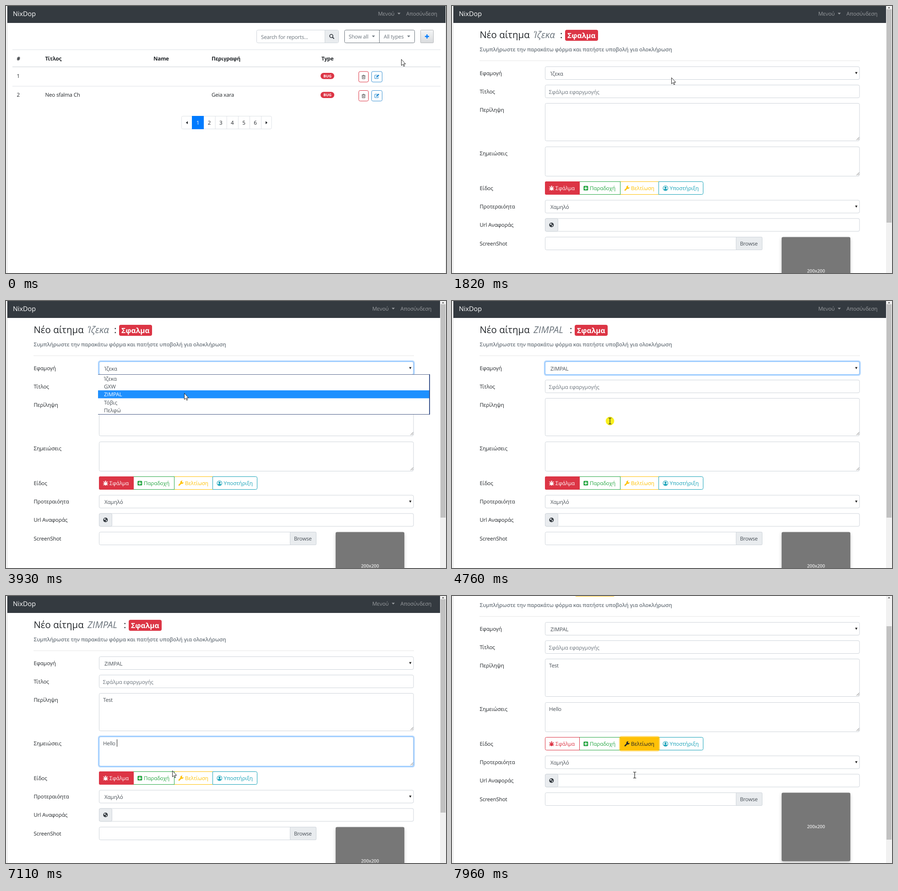
An HTML page for the animation above (8 s loop, 961 px wide and 583 px high).

```html
<!DOCTYPE html>
<html lang="el">
<head>
<meta charset="utf-8">
<title>Bug report form</title>
<style>
html, body { margin: 0; width: 100%; height: 100%; overflow: hidden; background: #fff; }
svg { display: block; width: 100vw; height: 100vh; }
text { font: 11.6px "Open Sans", "Noto Sans", sans-serif; letter-spacing: -.1px; white-space: pre; text-rendering: geometricPrecision; }
.en { letter-spacing: -.2px; }
.b { font-weight: 700; letter-spacing: -.25px; }
.mid { text-anchor: middle; }
.brand { font-size: 14.4px; letter-spacing: 0; }
.h { font-size: 20.4px; letter-spacing: 0; }
.i { font-style: italic; }
.sub { font-weight: 600; }
.badge { font-size: 15.5px; font-weight: 700; letter-spacing: 0; }
.pill { font-size: 8.2px; font-weight: 700; letter-spacing: 0; text-anchor: middle; }
</style>
</head>
<body>
<svg id="stage" viewBox="0 0 961 583"></svg>
<script>
const INK = '#212529', GREY = '#6c757d', FIELD = '#495057', LINE = '#ced4da';
const RED = '#dc3545', GREEN = '#28a745', GOLD = '#ffc107', TEAL = '#17a2b8', BLUE = '#007bff';
const APPS = ['Ίζεκα', 'GXW', 'ZIMPAL', 'Τόβις', 'Πελφώ'];

// drawing helpers, each returns SVG markup
const text = (x, y, s, fill = INK, cls = '', id = '') =>
  `<text x="${x}" y="${y}" fill="${fill}" class="${cls}" id="${id}">${s}</text>`;
const rect = (x, y, w, h, fill, stroke = 'none', r = 0, more = '') =>
  `<rect x="${x}" y="${y}" width="${w}" height="${h}" fill="${fill}" stroke="${stroke}" rx="${r}" ${more}/>`;
const path = (d, fill, stroke = 'none', w = 1, more = '') =>
  `<path d="${d}" fill="${fill}" stroke="${stroke}" stroke-width="${w}" ${more}/>`;
const at = (x, y, s) => `<g transform="translate(${x} ${y})">${s}</g>`;
const group = (id, s) => `<g id="${id}">${s}</g>`;
const caret = (x, y, fill, w = 3.4, h = 3.6) => path(`M${x - w},${y}h${2 * w}l${-w},${h}z`, fill);
const field = (y, h, x = 203.5, w = 686.5) => rect(x, y, w, h, '#fff', LINE, 3);
const ring = (id, x, y, w, h, edge, glow) => group(id,
  rect(x - 1.5, y - 1.5, w + 3, h + 3, 'none', glow, 4, 'stroke-width="2.4"') + rect(x, y, w, h, 'none', edge, 3));
const blueRing = (id, y, h) => ring(id, 203.5, y, 686.5, h, '#80bdff', 'rgba(0,123,255,.3)');
const grip = y => path(`M883.5,${y - 1.5}l6,-6M886.8,${y - 1.5}l2.7,-2.7`, 'none', '#666', .9);

const icon = {
  search: c => `<circle cx="-1" cy="-1" r="3.5" fill="none" stroke="${c}" stroke-width="1.7"/>` + path('M1.7,1.7L5,5', 'none', c, 2),
  trash: c => path('M-4,-2.5H4M-1.5,-2.7V-4H1.5V-2.7M-3,-2.5V4H3V-2.5M-1,-.8V2.4M1,-.8V2.4', 'none', c, .9),
  edit: c => path('M1.5,-3.5H-4.5V4H3V1', 'none', c, 1) + path('M-1.7,1.8L-1.3,-.6L3.4,-4.8L5.3,-2.8L.7,1.4z', c),
  bug: c => path('M-3,-1.2Q-3,-2.2 0,-2.2T3,-1.2V2Q2.6,5 0,5T-3,2zM-2,-3Q-1.8,-5.2 0,-5.2T2,-3z', c) +
    path('M-5,-3.6L-2.5,-1.3M5,-3.6L2.5,-1.3M-5.6,1H5.6M-5,4.6L-2.5,2.4M5,4.6L2.5,2.4', 'none', c, 1.1),
  plus: c => rect(-5, -5, 10, 10, c, 'none', 1.6) + path('M-3.2,0H3.2M0,-3.2V3.2', 'none', '#fff', 1.7),
  wrench: c => path('M-4.3,4.3L1.2,-1.2', 'none', c, 2.8, 'stroke-linecap="round"') +
    path('M3.2,-5.2A3.5,3.5 0 1 0 5.4,-2.4L2.9,-1.4L1.5,-2.8z', c),
  user: c => `<circle r="5.3" fill="none" stroke="${c}" stroke-width="1.1"/><circle cy="-1.3" r="2.3" fill="${c}"/>` +
    path('M-4,3Q-2.4,1.1 0,1.3T4,3Q2.3,5 0,5T-4,3', c),
  globe: c => `<circle r="5" fill="${c}"/>` + path('M-3.4,-2.5L-.6,-3.6L.6,-1.8L-1,.2L-2.6,-.2zM.8,.6L3.4,-.2L2.6,2.4L1,3.4z', '#e9ecef')
};

const navbar = (right, dx) => rect(3, 0, right - 3, 37, '#343a40') + text(15, 22, 'NixDop', '#fff', 'brand') +
  text(812.5 + dx, 20.7, 'Μενού', '#999c9f') + caret(858.3 + dx, 14.8, '#999c9f') + text(874 + dx, 20.7, 'Αποσύνδεση', '#999c9f');

function listPage() {
  const row = (n, y, title, about) => text(23.5, y + 4, n, INK, 'en') + text(85.5, y + 4, title, INK, 'en') +
    text(449, y + 4, about, INK, 'en') + rect(687, y - 6.5, 30, 13.5, RED, 'none', 6.7) + text(702, y + 3.3, 'BUG', '#fff', 'pill') +
    rect(770.5, y - 9.5, 21, 23, '#fff', RED, 3) + at(781, y + 2.5, icon.trash('#444')) +
    rect(798.5, y - 9.5, 23, 23, '#fff', '#3c93d3', 3) + at(810, y + 2, icon.edit('#2389cf'));
  let s = rect(0, 0, 961, 583, '#fff') + rect(960, 37, 1, 546, '#ddd') + navbar(960, 0);
  s += rect(547.5, 52.5, 179, 28, '#fff', LINE, 3) + path('M697,53H724Q726,53 726,55V78Q726,80 724,80H697z', '#e9ecef') +
    path('M696.5,52.5V80.5', 'none', LINE) + at(711.5, 66.5, icon.search('#343a40')) +
    text(557, 71.5, 'Search for reports...', GREY, 'en');
  s += rect(739.5, 52.5, 153, 28, '#fff', GREY, 3) + path('M815.5,52.5V80.5', 'none', GREY) +
    text(748.5, 70.8, 'Show all', GREY, 'en') + caret(802.5, 64.6, GREY) + text(825, 70.8, 'All types', GREY, 'en') + caret(879.5, 64.6, GREY);
  s += rect(905.5, 52.5, 28, 28, 'url(#metal)', '#b4b7ba', 1) + path('M915,66.5H924M919.5,62V71', 'none', BLUE, 2.4);
  s += rect(14, 95, 935, 1, '#dee2e6') + rect(14, 132, 935, 1.6, '#dee2e6') + rect(14, 174.6, 935, 1, '#dee2e6');
  for (const [x, label] of [[23.5, '#'], [85.5, 'Τίτλος'], [322, 'Name'], [449, 'Περιγραφή'], [689, 'Type']])
    s += text(x, 118.7, label, INK, 'b');
  s += row(1, 152.5, '', '') + row(2, 194, 'Neo sfalma Ch', 'Geia xara');
  s += rect(383.5, 240.5, 196.5, 28, '#fff', '#dee2e6', 3) + rect(406, 240, 26, 29, BLUE);
  for (let i = 0; i < 6; i++)
    s += text(419 + i * 25.1, 259, i + 1, i ? INK : '#fff', 'mid') + (i ? rect(431.5 + i * 25.1, 241, 1, 27, '#dee2e6') : '');
  s += path('M397,251.5V258L393,254.7zM567,251.5V258L571,254.7z', INK);
  return s + ring('ringPlus', 905.5, 52.5, 28, 28, '#8f9498', 'rgba(108,117,125,.4)');
}

function formPage() {
  let s = navbar(948, -12.5);
  s += text(60.5, 70.2, 'Νέο αίτημα', INK, 'h') + text(178, 70.2, '', GREY, 'h i', 'app') + text(236, 70.2, ':', INK, 'h', 'colon') +
    group('badge', rect(0, 52, 72, 24, RED, 'none', 4, 'id="badgeBox"') + text(5, 70, '', '#fff', 'badge', 'badgeText'));
  s += text(60.5, 99, 'Συμπλήρωστε την παρακάτω φόρμα και πατήστε υποβολή για ολοκλήρωση', GREY, 'sub') + rect(60, 119, 831, 1, '#e6e6e6');
  const labels = [['Εφαμογή', 147], ['Τίτλος', 187], ['Περίληψη', 227], ['Σημειώσεις', 321.5], ['Είδος', 398],
    ['Προτεραιόητα', 438], ['Url Αναφοράς', 478], ['ScreenShot', 519]];
  for (const [label, y] of labels) s += text(60.5, y + 4.2, label);
  s += field(132.5, 28) + text(215, 151.6, '', FIELD, '', 'choice') + caret(883, 144.3, '#222', 2.6, 4.6) +
    field(172.5, 28) + text(211.5, 192, 'Σφάλμα εφαργμογής', GREY) +
    field(212.5, 82) + grip(294) + text(212, 231.3, '', FIELD, 'en', 'summary') +
    field(307.5, 64) + grip(371) + text(212, 326, '', FIELD, 'en', 'notes');
  s += group('bugOn', rect(203, 383, 75.5, 29, RED, 'none', 3)) +
    path('M278.5,383.5H206.5Q203.5,383.5 203.5,386.5V408.5Q203.5,411.5 206.5,411.5H278.5', 'none', RED) +
    path('M367.5,383.5H451.5V411.5H367.5', 'none', GOLD) +
    path('M451.5,383.5H545.5Q548.5,383.5 548.5,386.5V408.5Q548.5,411.5 545.5,411.5H451.5z', 'none', TEAL) +
    rect(278.5, 383.5, 89, 28, '#fff', GREEN) + path('M278.5,383.5V411.5', 'none', RED, 1, 'id="bugEdge"') +
    group('goldOn', rect(367.5, 383, 84, 29, GOLD)) +
    ring('ringGold', 367.5, 383.5, 84, 28, GOLD, 'rgba(255,193,7,.55)');
  s += `<g id="bugInk" color="#fff">${at(217.5, 397.8, icon.bug('currentColor'))}${text(226, 402, 'Σφάλμα', 'currentColor')}</g>` +
    at(292.3, 397.8, icon.plus(GREEN)) + text(301, 402, 'Παραδοχή', GREEN) +
    `<g id="goldInk" color="${GOLD}">${at(382.3, 397.8, icon.wrench('currentColor'))}${text(391, 402, 'Βελτίωση', 'currentColor')}</g>` +
    at(466.3, 397.8, icon.user(TEAL)) + text(475.5, 402, 'Υποστήριξη', TEAL);
  s += field(424, 28) + text(215, 443, 'Χαμηλό', FIELD) + caret(883, 435.8, '#222', 2.6, 4.6) +
    field(464, 28) + rect(203.5, 464, 28, 28, '#e9ecef', LINE, 3) + at(217.3, 478, icon.globe('#343a40')) +
    field(504.5, 28, 203.5, 474) + rect(620.5, 504.5, 57, 28, '#e9ecef', LINE, 2) + text(629, 523, 'Browse', FIELD, 'en');
  s += rect(720, 504.5, 150, 149.5, '#777', 'none', 3, 'filter="url(#soft)"') +
    `<text x="795" y="582" class="mid" fill="#e4e4e4" style="font-size:10px;font-weight:600">200x200</text>`;
  s += blueRing('ringSelect', 132.5, 28) + blueRing('ringSummary', 212.5, 82) + blueRing('ringNotes', 307.5, 64) +
    rect(0, 0, 1, 16, '#222', 'none', 0, 'id="typeBar"');
  s += group('menu', rect(201, 160, 724.5, 88, '#fff') + rect(201, 195, 723.5, 17.3, '#1e90ff', 'none', 0, 'id="hover"') +
    rect(201, 160, 725, 1, '#5b6c8f') + rect(201, 247, 725, 1, '#4a5c86') + rect(924.3, 160, 1.7, 88, '#1f3b7d') +
    APPS.map((a, i) => text(214, 173.8 + i * 17.3, a, FIELD, '', 'app' + i)).join(''));
  return s;
}

const stage = document.getElementById('stage');
stage.innerHTML = `<defs>
  <linearGradient id="metal" x2="0" y2="1"><stop stop-color="#f4f5f6"/><stop offset="1" stop-color="#d9dbdd"/></linearGradient>
  <filter id="soft" x="-10%" y="-10%" width="120%" height="125%"><feDropShadow dx="0" dy="3" stdDeviation="3" flood-opacity=".25"/></filter>
</defs>` +
  group('list', listPage()) +
  group('form', rect(0, 0, 961, 583, '#fff') + group('page', formPage()) +
    rect(948, 0, 13, 583, '#f1f1f1') + path('M952,5L954.5,2L957,5z', '#555') + rect(949, 7, 11, 466, '#c1c1c1', 'none', 0, 'id="thumb"')) +
  rect(0, 0, 2, 583, '#fafafa') + rect(2, 0, 1, 583, '#dcdcdc') +
  group('mouse', '<circle id="click" r="9.3" fill="#fbf01c"/>' +
    path('M0.5,.5V14L3.6,11.2L5.7,15.8L7.6,15L5.6,10.5H9.6z', '#fff', '#111', .9, 'id="arrow"') +
    path('M-3.3,-6.5H-.9L0,-5.8L.9,-6.5H3.3M0,-5.8V5.8M-3.3,6.5H-.9L0,5.8L.9,6.5H3.3', 'none', '#222', 1.2, 'id="beam"') +
    path('M-1,1Q0,-.6 1.2,1V6L6,7Q8,7.4 7.8,9.5L6.8,13V16H-.2V14L-4.6,9.4Q-4.8,7.4 -3,8L-1,9.6z', '#fff', '#111', .9, 'id="hand"'));

const el = {};
stage.querySelectorAll('[id]').forEach(n => { if (n.id) el[n.id] = n; });

// pointer path: time, x, y
const PATH = [[0, 863, 116], [670, 919, 72], [1360, 919, 71], [1800, 479, 156], [1900, 479, 156], [2210, 425, 191],
  [2540, 425, 191], [2660, 428, 167], [2770, 428, 167], [2890, 430, 145], [3230, 430, 145], [3500, 422, 141],
  [3610, 422, 141], [3880, 389, 201], [4060, 388, 204], [4240, 388, 204], [4700, 345, 262], [5390, 345, 262],
  [5710, 326, 336], [5900, 326, 336], [6900, 363, 381], [7110, 363, 381], [7390, 399, 396], [7570, 399, 396],
  [7850, 397, 385], [7930, 399, 391]];
const CLICKS = [[910, 1060], [3060, 3140], [4160, 4310], [4740, 4860], [5740, 5850], [7400, 7500]];
const HIDDEN = [[4990, 5450], [6010, 7110]];
const TEST = [4990, 5070, 5140, 5220], HELLO = [6010, 6090, 6470, 6640, 6800, 7110];

const clamp = v => Math.max(0, Math.min(1, v));
const ease = v => v * v * (3 - 2 * v);
const within = (t, spans) => spans.some(([a, b]) => t >= a && t < b);
const fade = (t, on, off = 1e9) => clamp((t - on) / 150) - clamp((t - off) / 150);
const typed = (t, word, times) => word.slice(0, times.filter(k => t >= k).length);
const show = (id, on) => el[id].style.display = on ? '' : 'none';
const write = (id, s) => { if (el[id].textContent !== s) el[id].textContent = s; };
const attr = (id, o) => { for (const k in o) el[id].setAttribute(k, o[k]); };
const STEP = 76.5;
const held = t => Math.max(0, 60 + Math.floor((t - 55) / STEP) * STEP);

function pointer(t) {
  const i = PATH.findIndex(p => p[0] > t);
  if (i < 0) return PATH[PATH.length - 1].slice(1);
  const [t0, x0, y0] = PATH[i - 1], [t1, x1, y1] = PATH[i];
  const k = ease((t - t0) / (t1 - t0));
  return [x0 + (x1 - x0) * k, y0 + (y1 - y0) * k];
}

function pointerKind(onForm, menu, x, y) {
  if (!onForm) return x > 905 && y < 81 ? 'hand' : 'arrow';
  if (menu || x < 203 || x > 890) return 'arrow';
  if (within(y, [[172, 201], [212, 295], [307, 372], [464, 493]])) return 'beam';
  return x < 549 && y >= 383 && y < 412 ? 'hand' : 'arrow';
}

function draw(t) {
  const q = held(t), [x, y] = pointer(q);
  const onForm = t >= 1290, menu = t >= 3610 && t < 4240, chosen = t >= 4240, gold = t >= 7420;
  const scroll = 75 * ease(clamp((q - 7620) / 210));
  show('list', !onForm);
  show('form', onForm);
  attr('page', { transform: `translate(0 ${-scroll})` });
  attr('thumb', { y: 7 + scroll * 59 / 75 });

  const app = APPS[chosen ? 2 : 0];
  write('app', app);
  write('choice', app);
  attr('colon', { x: chosen ? 257 : 236 });
  attr('badge', { transform: `translate(${chosen ? 268 : 247} 0)` });
  attr('badgeBox', { width: gold ? 88 : 72, fill: gold ? GOLD : RED });
  attr('badgeText', { fill: gold ? INK : '#fff' });
  write('badgeText', gold ? 'Βελτίωση' : 'Σφαλμα');

  show('menu', menu);
  const hover = Math.max(0, Math.min(4, Math.floor((y - 160.5) / 17.3)));
  attr('hover', { y: 160.5 + hover * 17.3 });
  APPS.forEach((a, i) => attr('app' + i, { fill: i === hover ? '#fff' : FIELD }));

  write('summary', typed(t, 'Test', TEST));
  write('notes', typed(t, 'Hello ', HELLO));
  const box = t < 5850 ? 'summary' : 'notes';
  show('typeBar', within(t, [[4860, 5700], [5900, 7420]]));
  if (onForm) attr('typeBar', { x: Math.round(212.5 + el[box].getComputedTextLength()), y: box === 'summary' ? 219 : 313 });

  const rings = { Plus: [985], Select: [3290, 4780], Summary: [4780, 5850], Notes: [5850, 7420], Gold: [7420] };
  for (const k in rings) el['ring' + k].style.opacity = fade(t, ...rings[k]);

  const lit = gold || (t > 7110 && x > 368 && y > 383);
  show('bugOn', !gold);
  show('bugEdge', true);
  show('goldOn', lit);
  attr('bugInk', { color: gold ? RED : '#fff' });
  attr('goldInk', { color: lit ? INK : GOLD });

  const kind = pointerKind(onForm, menu, x, y + scroll);
  for (const k of ['arrow', 'beam', 'hand']) show(k, k === kind);
  show('mouse', !within(t, HIDDEN));
  show('click', within(t, CLICKS));
  attr('mouse', { transform: `translate(${Math.round(x)} ${Math.round(y)})` });
}

const start = performance.now();
function tick() {
  draw((performance.now() - start) % 8000);
  requestAnimationFrame(tick);
}
tick();
</script>
</body>
</html>
```
